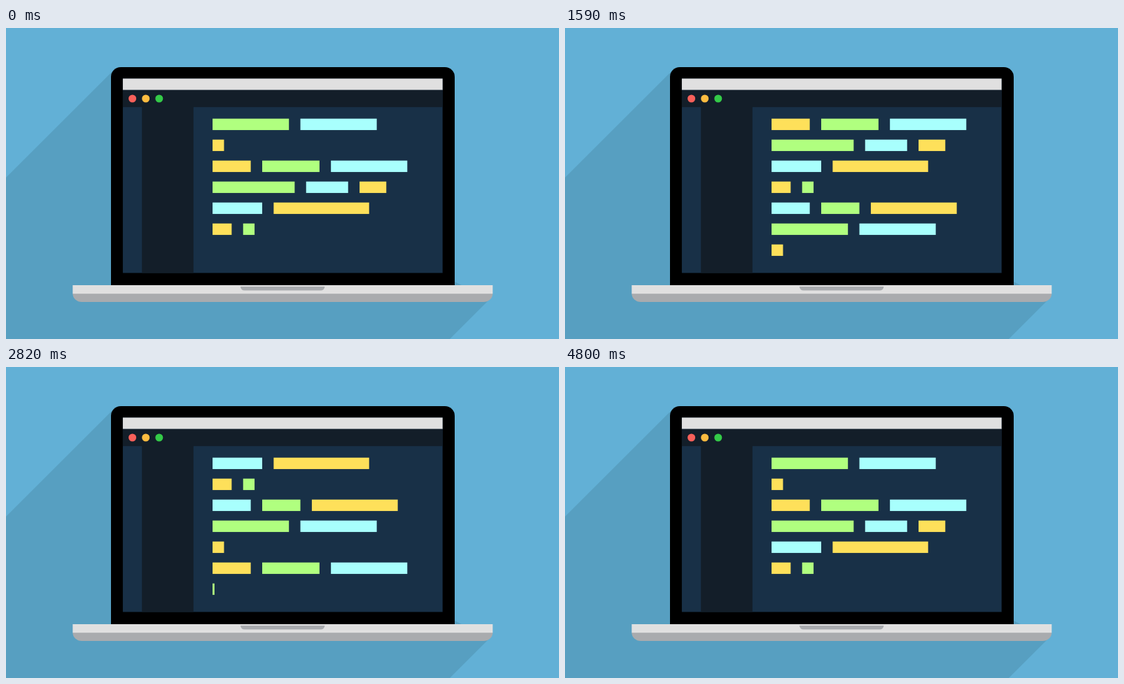
Animation of 790x445 px, one loop 4830 ms. Source, as an HTML page:

```html
<!DOCTYPE html>
<html lang="en">
<head>
<meta charset="utf-8">
<title>Coding laptop</title>
<style>
  html, body { margin: 0; width: 100%; height: 100%; overflow: hidden; background: #62b0d6; }
  svg { display: block; }
</style>
</head>
<body>
<svg width="790" height="445" viewBox="0 0 790 445">
  <defs>
    <clipPath id="view"><rect x="-5" y="-2.4" width="115" height="77"/></clipPath>
  </defs>
  <rect width="790" height="445" fill="#62b0d6"/>
  <path d="M154 60L0 214V445H634L691 388L651 368L641 363V200Z" fill="#579fc1"/>

  <path d="M150 368V70a14 14 0 0 1 14-14H627a14 14 0 0 1 14 14V368Z"/>
  <rect x="166.9" y="72.4" width="456.8" height="278.1" fill="#183047"/>
  <rect x="166.9" y="72.4" width="456.8" height="16.4" fill="#e0e0e0"/>
  <rect x="166.9" y="88.7" width="456.8" height="24.5" fill="#131e29"/>
  <rect x="194.2" y="113" width="73.6" height="237.5" fill="#131e29"/>
  <circle cx="180.6" cy="101" r="5.5" fill="#f9605a"/>
  <circle cx="199.7" cy="101" r="5.5" fill="#fdbc40"/>
  <circle cx="218.8" cy="101" r="5.5" fill="#34ca48"/>

  <g transform="translate(295.1 129.7) scale(2.7273)">
    <g clip-path="url(#view)"><g id="code"></g></g>
  </g>

  <path d="M95.3 380H695.3a13 12 0 0 1-13 12H108.3a13 12 0 0 1-13-12Z" fill="#a9abae"/>
  <rect x="95.3" y="368" width="600" height="12.2" fill="#e0e0e0"/>
  <path d="M335 370H455.3a5.5 5.5 0 0 1-5.5 5.5H340.5a5.5 5.5 0 0 1-5.5-5.5Z" fill="#a9abae"/>
</svg>
<script>
  const TICK = 30, TICKS = 161;
  const ROW = 11, BAR = 6, GAP = 6, SCROLL = 5;
  const COLORS = { g: '#b0ff7f', c: '#a8fffd', y: '#fee05a' };
  const LINES = ['g40 c40', 'y6', 'y20 g30 c40', 'g43 c22 y14', 'c26 y50', 'y10 g6', 'c20 g20 y45'];
  const SHOWN = LINES.length - 1;

  const code = document.getElementById('code');
  const bars = [], scrolls = [];

  function addBar(x, row, color, width, start, span) {
    const el = document.createElementNS('http://www.w3.org/2000/svg', 'rect');
    el.setAttribute('x', x);
    el.setAttribute('y', row * ROW);
    el.setAttribute('height', BAR);
    el.setAttribute('fill', COLORS[color]);
    code.append(el);
    bars.push({ el, width, start, span });
  }

  // Lay out one full cycle; the first rows are already typed.
  let tick = 1;
  for (let row = 0; row < SHOWN + LINES.length; row++) {
    const typed = row >= SHOWN;
    const line = LINES[row % LINES.length];
    let x = 0, end = 0;
    for (const item of line.split(' ')) {
      const width = +item.slice(1);
      const span = width < 40 ? 2 : 5;
      addBar(x, row, item[0], width, typed ? tick : -99, span);
      x += width + GAP;
      if (typed) {
        end = tick + span;
        tick = end + 3;
      }
    }
    if (typed) {
      const pause = line === 'y6' || line === 'y10 g6' ? 8 : 4;
      scrolls.push(end + pause - 1);
      tick = end + pause + SCROLL + 2;
    }
  }

  const progress = (now, start, span) => Math.min(1, Math.max(0, (now - start) / span));

  function draw(now) {
    for (const b of bars) {
      const width = now < b.start ? 0 : 1 + (b.width - 1) * progress(now, b.start, b.span);
      b.el.setAttribute('width', width);
    }
    const shift = scrolls.reduce((sum, start) => sum + progress(now, start, SCROLL), 0);
    code.setAttribute('transform', `translate(0 ${-shift * ROW})`);
  }

  let origin = null;
  function loop(time) {
    origin ??= time;
    draw(Math.floor((time - origin) / TICK + 0.001) % TICKS);
    requestAnimationFrame(loop);
  }
  draw(0);
  requestAnimationFrame(loop);
</script>
</body>
</html>
```
